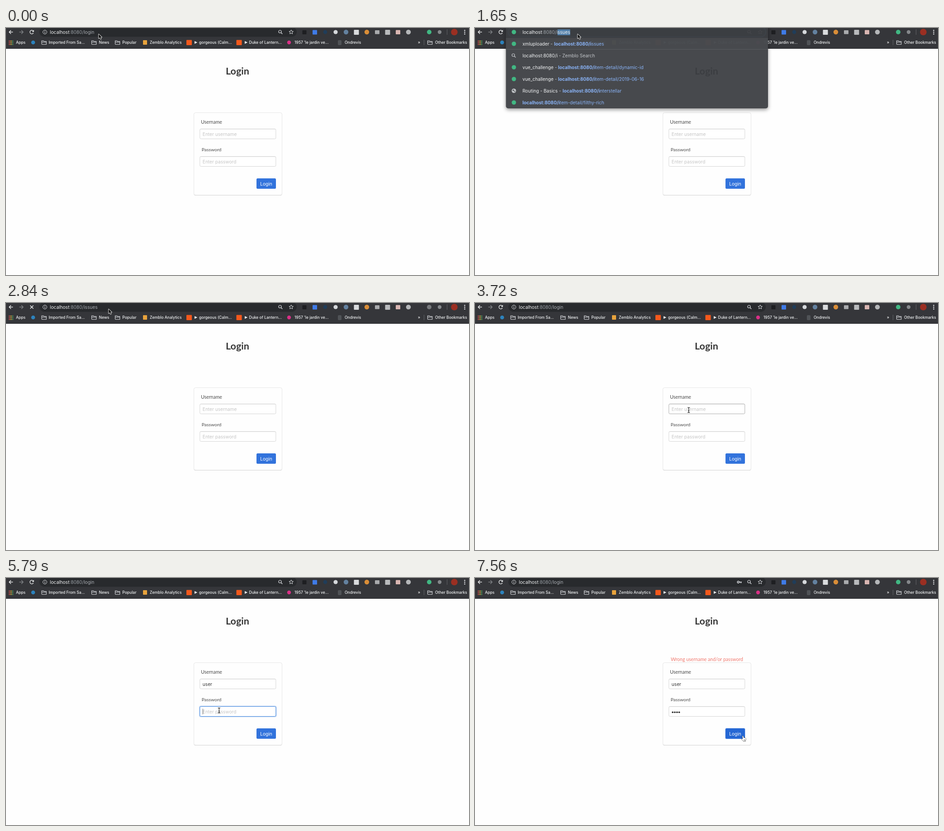
These frames come from a looping animation (1024 px wide and 547 px high, 8 s). An HTML page with a canvas:

```html
<!DOCTYPE html>
<html lang="en">
<head>
<meta charset="utf-8">
<title>Login</title>
<style>
html, body { margin: 0; width: 100%; height: 100%; overflow: hidden; background: #fefefe; }
canvas { display: block; width: 100vw; height: 100vh; }
</style>
</head>
<body>
<canvas id="stage"></canvas>
<script>
const W = 1024, H = 547, LOOP = 8000;
const canvas = document.getElementById('stage');
const ratio = window.devicePixelRatio || 1;
canvas.width = Math.round(W * ratio);
canvas.height = Math.round(H * ratio);
const c = canvas.getContext('2d');

const UI = 'Inter, Roboto, sans-serif', FORM = 'Lato, "Open Sans", sans-serif';
const URL_FONT = `10.15px ${UI}`, URL_BOLD = `700 10.15px ${UI}`, MARK_FONT = `500 8.5px ${UI}`;
const WHITE = '#f1f3f4', GREY = '#9aa0a6', SOFT = '#c3c6ca', LINK = '#8ab4f8', GREEN = '#41b883';
const USER = 'user', HOST = 'localhost:8080/';

// Draws text and returns the x where it ends.
function text(str, x, y, font, color) {
  c.font = font;
  c.fillStyle = color;
  c.fillText(str, x, y);
  return x + c.measureText(str).width;
}

function runs(list, x, y) {
  for (const [str, font, color] of list) x = text(str, x, y, font, color);
  return x;
}

function box(x, y, w, h, r, fill, stroke, line = 1) {
  c.beginPath();
  c.roundRect(x, y, w, h, r);
  if (fill) { c.fillStyle = fill; c.fill(); }
  if (stroke) { c.strokeStyle = stroke; c.lineWidth = line; c.stroke(); }
}

function dot(x, y, r, fill) {
  c.beginPath();
  c.arc(x, y, r, 0, 7);
  c.fillStyle = fill;
  c.fill();
}

function ring(x, y, r, color, line = 1, from = 0, to = 7) {
  c.beginPath();
  c.arc(x, y, r, from, to);
  c.strokeStyle = color;
  c.lineWidth = line;
  c.stroke();
}

function line(color, width, ...pts) {
  c.beginPath();
  for (let i = 0; i < pts.length; i += 2) c.lineTo(pts[i], pts[i + 1]);
  c.strokeStyle = color;
  c.lineWidth = width;
  c.stroke();
}

function poly(fill, ...pts) {
  c.beginPath();
  for (let i = 0; i < pts.length; i += 2) c.lineTo(pts[i], pts[i + 1]);
  c.closePath();
  c.fillStyle = fill;
  c.fill();
}

function magnifier(x, y, color) {
  ring(x - 1, y - 1, 3, color, 1.2);
  line(color, 1.4, x + 1.2, y + 1.2, x + 4.3, y + 4.3);
}

function folder(x) {
  line('#dadce0', 1.1, x - 5, 36, x - 5, 28.3, x - 1, 28.3, x, 29.7, x + 5.2, 29.7, x + 5.2, 36.3, x - 5, 36.3);
  line('#dadce0', 1, x - 5, 31.3, x + 5, 31.3);
}

function star(x, y) {
  c.beginPath();
  for (let i = 0; i <= 10; i++) {
    const a = i * Math.PI / 5 - Math.PI / 2, r = i % 2 ? 2.3 : 5;
    c.lineTo(x + r * Math.cos(a), y + r * Math.sin(a));
  }
  c.strokeStyle = '#dadce0';
  c.lineWidth = 1;
  c.stroke();
}

function globe(x, y) {
  dot(x, y, 4.8, '#c4c7ca');
  poly('#55585c', x - 3.5, y - 1.5, x, y - 3, x + 1, y - 1, x - 1.5, y + 1);
  poly('#55585c', x, y + 1, x + 3.5, y, x + 2, y + 3.2);
}

function reload(loading) {
  if (loading) {
    line(WHITE, 1.5, 53.5, 5.5, 60.5, 12.5);
    line(WHITE, 1.5, 60.5, 5.5, 53.5, 12.5);
    return;
  }
  ring(57, 9, 4, WHITE, 1.4, 0.5, 5.6);
  poly(WHITE, 61.7, 4.2, 61.7, 8.6, 57.4, 8.6);
}

function toolbar(s) {
  c.fillStyle = '#35363a';
  c.fillRect(0, 0, W, 46);
  c.fillStyle = '#292a2e';
  c.fillRect(0, 45, W, 1);

  line(WHITE, 1.4, 15.3, 9, 7, 9);
  line(WHITE, 1.4, 11, 5, 7, 9, 11, 13);
  line('#85888c', 1.3, 29.5, 9, 38, 9);
  line('#85888c', 1.3, 34, 5, 38, 9, 34, 13);
  reload(s.loading);

  if (s.focus === 'url') box(73.2, -2, 570, 21.5, 10.7, '#3b3f43', '#4f86b0', 1.8);
  else box(74, -2, 569, 21.5, 10.7, '#282a2d');
  ring(86, 9, 4.4, '#dadce0', 1);
  c.fillStyle = '#dadce0';
  c.fillRect(85.4, 8.4, 1.2, 3);
  c.fillRect(85.4, 6.3, 1.2, 1.2);
  address(97, s);

  if (s.key) {
    ring(582.3, 9, 2.1, '#dadce0', 1.5);
    line('#dadce0', 1.6, 584.4, 9, 590, 9);
    line('#dadce0', 1.6, 588.2, 9, 588.2, 11.5);
  }
  magnifier(607, 9, '#dadce0');
  star(630.7, 9);

  // extensions
  box(655.5, 5, 9, 9, 1, '#1d1e21');
  box(678, 4.5, 10, 10, 1, '#3f7be8');
  dot(706, 9, 4.4, '#203d59');
  dot(729, 9, 4.6, '#d5d8db');
  dot(752, 9, 5.2, '#63819f');
  box(769.5, 4, 11, 11, 1, '#d9dbdd');
  dot(798, 9, 5.2, '#d98d37');
  box(816, 5, 10, 8.5, 1, '#a9abad');
  box(838.5, 4, 11, 11, 1, '#b9bbbd');
  box(862, 4.5, 10, 9.5, 1, '#d9b6b2');
  dot(890, 9, 5.3, '#b4b6b8');
  dot(936, 9, 5, s.loading ? '#77797c' : GREEN);
  dot(959, 9, 4.2, '#85888b');
  line('#616367', 1, 975.5, 3, 975.5, 15);
  dot(991.5, 9, 7.3, '#9b2f22');
  for (const y of [5.2, 9.2, 13.2]) dot(1014.5, y, 1.2, WHITE);
}

function address(x, s) {
  const path = s.path, y = 13;
  c.font = URL_FONT;
  const width = str => c.measureText(str).width;
  if (s.mark >= 0) {
    const full = HOST + path, from = width(full.slice(0, s.mark));
    c.fillStyle = '#527fa9';
    c.fillRect(x + from, 3, width(full) - from, 13);
  }
  const end = runs([['localhost', URL_FONT, WHITE], [':8080/', URL_FONT, GREY]], x, y);
  if (s.mark < 0) text(path, end, y, URL_FONT, '#a9adb2');
  else {
    const plain = path.slice(0, Math.max(0, s.mark - HOST.length));
    runs([[plain, URL_FONT, '#a9adb2'], [path.slice(plain.length), URL_FONT, WHITE]], end, y);
  }
  if (s.caret) {
    c.font = URL_FONT;
    line(WHITE, 0.8, x + width(HOST + path) + 0.6, 3.5, x + width(HOST + path) + 0.6, 15.5);
  }
}

function bookmarks() {
  const colors = ['#d9574a', '#e0b13f', '#54a35f', '#5b8fe0'];
  for (let i = 0; i < 9; i++) {
    c.fillStyle = colors[(i + (i / 3 | 0)) % 4];
    c.fillRect(6.3 + i % 3 * 3.7, 27.8 + (i / 3 | 0) * 3.7, 2.3, 2.3);
  }
  dot(60, 32, 4.3, '#2d83bd');
  [84, 194.5, 246.5, 937.5].forEach(folder);
  box(303, 27, 9, 10, 1, '#e8a33c');
  for (const x of [399, 509.5]) box(x, 26.5, 12, 11.5, 1, '#f4581c');
  for (const x of [417, 528]) poly(WHITE, x, 29, x + 6.3, 32, x, 35);
  dot(626, 32, 4.2, '#d92f86');
  box(734, 27, 8, 11, 2, '#505357');
  const labels = [
    ['Apps', 22], ['Imported From Sa...', 94.5], ['News', 205.5], ['Popular', 257.3],
    ['Zemblo Analytics', 318], ['gorgeous (Calm...', 427], ['Duke of Lantern...', 537.5],
    ["1957 'le jardin ve...", 638], ['Ondrevis', 749], ['»', 911], ['Other Bookmarks', 949]
  ];
  for (const [str, x] of labels) text(str, x, 35.2, MARK_FONT, WHITE);
  line('#616367', 1, 924.5, 26, 924.5, 38);
}

function field(y, hint, focused, hovered, value) {
  if (focused) box(427.8, y - 0.2, 170, 23.4, 3, null, 'rgba(50,115,220,.25)', 2);
  box(428.8, y + 0.5, 168, 22, 2.5, '#fff', focused ? '#3f86dd' : hovered ? '#adadad' : '#d6d6d6');
  if (!focused) line('rgba(0,0,0,.08)', 1, 430, y + 1.2, 596, y + 1.2);
  let end = 435;
  if (!value) text(hint, 434.8, y + 16, URL_FONT, '#c5c5c5');
  else if (value[0] === '•') {
    for (let i = 0; i < value.length; i++) dot(437.2 + i * 4.8, y + 13.3, 1.9, '#363636');
    end = 435.3 + value.length * 4.8;
  } else end = text(value, 434.8, y + 16, URL_FONT, '#363636');
  if (focused) line('#444', 0.8, end + 0.4, y + 5.5, end + 0.4, y + 18);
}

function page(s) {
  c.fillStyle = '#fefefe';
  c.fillRect(0, 46, W, H - 46);
  text('Login', 486, 103.2, `700 21.5px ${FORM}`, '#363636');
  if (s.error) text('Wrong username and/or password', 433, 184.2, `10.55px ${FORM}`, '#f0776c');
  box(415.5, 188, 195, 183, 4, '#d2d2d2');
  box(415.5, 187.5, 195, 182.5, 4, '#fefefe', '#e6e6e6');
  text('Username', 431.2, 212.2, `10.5px ${FORM}`, '#4a4a4a');
  text('Password', 432.8, 273.2, `10.4px ${FORM}`, '#4a4a4a');
  field(223, 'Enter username', s.focus === 'name', s.hover === 'name', USER.slice(0, s.name));
  field(284, 'Enter password', s.focus === 'pass', s.hover === 'pass', '•'.repeat(s.pass));
  if (s.focus === 'button') box(553, 332, 45, 25, 3.5, 'rgba(50,115,220,.28)');
  box(554, 333, 43, 23, 2.5, s.hover === 'button' ? '#2567d4' : '#3273dc');
  text('Login', 562.2, 348.8, URL_FONT, '#fff');
}

function dropdown(s) {
  const typed = s.typed, first = typed.length === 1;
  const bottom = first ? 178 : 74;
  c.save();
  c.shadowColor = 'rgba(0,0,0,.42)';
  c.shadowBlur = 9 * ratio;
  c.shadowOffsetY = 3 * ratio;
  c.beginPath();
  c.rect(0, 0, W, H);
  c.roundRect(68.5, -10, 579.5, bottom + 10, 5);
  c.clip('evenodd');
  box(68.5, -10, 579.5, bottom + 10, 5, '#3c3d41');
  c.restore();
  box(68.5, -10, 579.5, bottom + 10, 5, first ? 'rgba(60,62,66,.94)' : '#3d3f42');
  c.fillStyle = first ? 'rgba(80,84,88,.55)' : '#4a4d50';
  c.fillRect(68.5, 22, 579.5, 25.5);
  if (first) line('#55585b', 1, 68.5, 47.5, 648, 47.5);

  dot(86, 9, 4.8, GREEN);
  address(105, s);
  dot(86, 35, 4.8, GREEN);
  magnifier(85.7, 61, SOFT);
  const bold = HOST + typed;
  const row = (y, title, x, rest) => {
    if (title) runs([[title, URL_FONT, WHITE], [' - ', URL_FONT, SOFT]], 105, y);
    runs([[bold, URL_BOLD, LINK], [rest, URL_FONT, LINK]], x, y);
  };
  row(38.8, 'xmluploader', 175, 'issues'.slice(typed.length));
  runs([[bold, URL_FONT, WHITE], [' - Zemblo Search', URL_FONT, SOFT]], 105, 64.8);
  if (!first) return;
  for (const y of [87, 113, 165]) dot(86, y, 4.8, GREEN);
  globe(86, 139);
  row(90.8, 'vue_challenge', 183.8, 'tem-detail/dynamic-id');
  row(116.8, 'vue_challenge', 183.8, 'tem-detail/2019-06-16');
  row(142.8, 'Routing - Basics', 193.8, 'nterstellar');
  row(168.8, '', 105, 'tem-detail/filthy-rich');
}

const pointers = {
  arrow() {
    const p = new Path2D('M0 0V9.6L2.3 7.5L4 11.3L5.7 10.5L4.1 6.9H7Z');
    outline(p, '#111', '#fff', 1.5);
  },
  beam() {
    const p = new Path2D('M-2.6 -5.8Q0 -5.8 0 -4V4Q0 5.8 -2.6 5.8M2.6 -5.8Q0 -5.8 0 -4V4Q0 5.8 2.6 5.8M-1.4 1.5H1.4');
    c.strokeStyle = '#fff';
    c.lineWidth = 2.4;
    c.stroke(p);
    c.strokeStyle = '#111';
    c.lineWidth = 1.1;
    c.stroke(p);
  },
  hand() {
    const p = new Path2D('M0 .4Q1 -.6 1.8 .6L2.6 4L6.4 5Q7.8 5.6 7.6 7.3L7 9.6V11.8H1.8L-1.9 7.7Q-2.3 6.3 -.7 6.6L.6 7.4Z');
    outline(p, '#fff', '#111', 1);
    line('#111', 0.6, 3.6, 8, 3.6, 10.4);
    line('#111', 0.6, 5.4, 8, 5.4, 10.4);
  }
};

function outline(path, fill, stroke, width) {
  c.lineWidth = width;
  c.strokeStyle = stroke;
  c.lineJoin = 'round';
  c.stroke(path);
  c.fillStyle = fill;
  c.fill(path);
}

// Each entry changes part of the state from its time on.
const beam = (x, y) => ({ cursor: 'beam', x, y });
const arrow = (x, y) => ({ cursor: 'arrow', x, y });
const steps = [
  [0, { ...arrow(205, 13.5), path: 'login', mark: -1, caret: false, typed: '', focus: '', hover: '',
        name: 0, pass: 0, key: false, error: false, loading: false }],
  [290, beam(213, 14)],
  [440, { ...beam(222, 14), focus: 'url', mark: 0 }],
  [590, beam(227, 14.5)],
  [740, { mark: HOST.length }],
  [910, beam(227.3, 14.7)],
  [1650, { ...arrow(227, 13.5), path: 'issues', typed: 'i', mark: HOST.length + 1 }],
  [1800, { typed: 'is', mark: HOST.length + 2 }],
  [1950, { typed: 'iss', mark: HOST.length + 3 }],
  [2100, { typed: 'issu', mark: HOST.length + 4 }],
  [2250, { typed: 'issues', mark: -1, caret: true }],
  [2840, { typed: '', caret: false, focus: '', loading: true }],
  [2990, { path: 'login', ...arrow(236, 24) }],
  [3130, { loading: false, ...arrow(276, 66) }],
  [3280, arrow(352, 138)],
  [3430, arrow(425, 200)],
  [3580, { ...beam(464, 232), hover: 'name' }],
  [3720, beam(472.7, 237)],
  [3870, { ...beam(473.3, 236.7), focus: 'name' }],
  [4020, { cursor: '' }],
  [4470, { name: 1 }],
  [4620, { name: 2 }],
  [4760, { name: 3 }],
  [4910, { name: 4 }],
  [5200, beam(473, 240)],
  [5350, { ...arrow(473, 265), hover: '' }],
  [5490, arrow(472, 309)],
  [5640, { ...beam(471.5, 298), hover: 'pass' }],
  [5790, { ...beam(471.3, 293.3), focus: 'pass' }],
  [6390, { cursor: '', pass: 1, key: true }],
  [6540, { pass: 2 }],
  [6680, { pass: 3 }],
  [6830, { pass: 4 }],
  [7120, { ...arrow(522, 318), hover: '' }],
  [7270, { cursor: 'hand', x: 585, y: 345, hover: 'button' }],
  [7410, { x: 591.5, y: 349.5, focus: 'button' }],
  [7560, { error: true }]
];

function stateAt(t) {
  const s = {};
  for (const [at, change] of steps) if (at <= t) Object.assign(s, change);
  return s;
}

function draw(t) {
  const s = stateAt(t);
  c.setTransform(ratio, 0, 0, ratio, 0, 0);
  c.lineJoin = 'miter';
  page(s);
  toolbar(s);
  bookmarks();
  if (s.typed) dropdown(s);
  if (s.cursor) {
    c.translate(s.x, s.y);
    pointers[s.cursor]();
  }
}

const start = performance.now();
function tick() {
  draw((performance.now() - start) % LOOP);
  requestAnimationFrame(tick);
}
tick();
</script>
</body>
</html>
```
